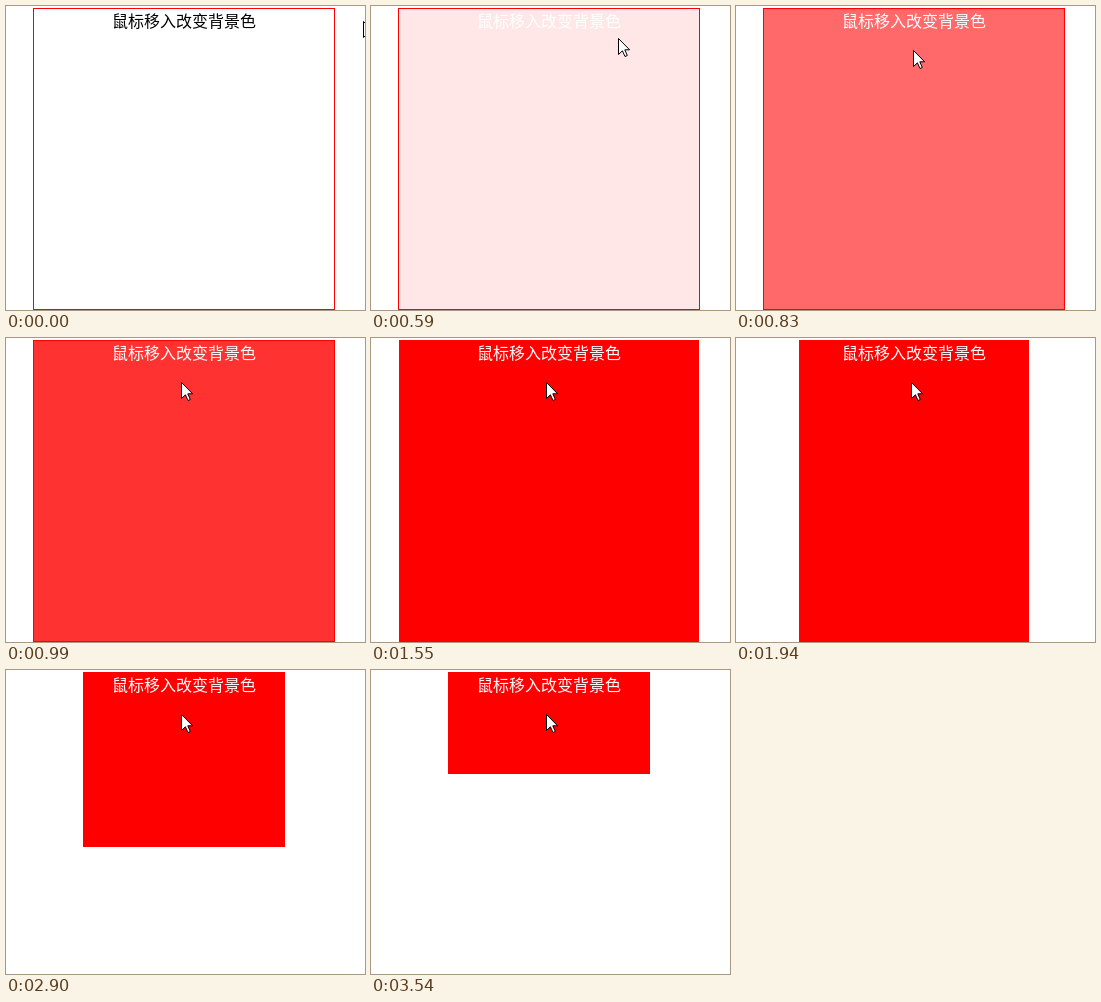
Write an HTML page that moves like this. It is 359 by 304 pixels and loops after 4.16 s.

```html
<!DOCTYPE html>
<html lang="zh">
<head>
<meta charset="utf-8">
<title>鼠标移入改变背景色</title>
<style>
  html, body { margin: 0; width: 100%; height: 100%; overflow: hidden; background: #fff; }
  #stage { position: relative; width: 359px; height: 304px; overflow: hidden; }
  #box { position: absolute; top: 2px; box-sizing: border-box; border: 1px solid #f00; }
  #label {
    position: absolute; top: 2px; left: 78px; width: 200px;
    text-align: center; white-space: nowrap;
    font: 16px/24px "Noto Sans CJK SC", "Noto Sans CJK", "Noto Sans CJK JP", sans-serif;
  }
  #cursor { position: absolute; left: 0; top: 0; }
</style>
</head>
<body>
<div id="stage">
  <div id="box"></div>
  <div id="label">鼠标移入改变背景色</div>
  <svg id="cursor" width="13" height="20">
    <path d="M.5 .5V16.5L4.4 12.8L7 18.5L9.3 17.5L6.8 11.8H11.6Z" fill="#fff" stroke="#000"/>
  </svg>
</div>
<script>
const LOOP = 4160, STEP = 80, CENTER = 178;
const [box, label, cursor] = ['box', 'label', 'cursor'].map(id => document.getElementById(id));

// Screen time -> time since the pointer entered the box
const CLOCK = [[490, 0], [990, 500], [1940, 1425], [2020, 1500], [2900, 2370], [3060, 2517], [3540, 3000]];
// Time, x, y of the pointer tip
const POINTER = [[0, 357, 15], [429, 357, 15], [430, 338, 18], [510, 296, 24], [590, 247, 32],
  [670, 207, 39], [750, 182, 43], [830, 177, 44], [910, 175, 44]];

function lerpTable(table, t, col = 1) {
  if (t <= table[0][0]) return table[0][col];
  const i = table.findIndex(row => row[0] > t);
  if (i < 0) return table[table.length - 1][col];
  const a = table[i - 1], b = table[i];
  return a[col] + (b[col] - a[col]) * (t - a[0]) / (b[0] - a[0]);
}

// cubic-bezier(.25, .1, .25, 1)
function ease(x) {
  if (x <= 0) return 0;
  if (x >= 1) return 1;
  const curve = (p, q, s) => 3 * p * s * (1 - s) ** 2 + 3 * q * s * s * (1 - s) + s ** 3;
  let lo = 0, hi = 1;
  for (let i = 0; i < 30; i++) {
    const mid = (lo + hi) / 2;
    if (curve(.25, .25, mid) < x) lo = mid; else hi = mid;
  }
  return curve(.1, 1, lo);
}

// The screen refreshes in steps of 80 ms
function snap(t) {
  if (t < 430) return 0;
  const base = t < 1940 ? 430 : 1940;
  return base + Math.floor((t - base) / STEP) * STEP;
}

function draw(time) {
  const t = snap(time);
  const since = lerpTable(CLOCK, t);
  const phase = n => ease(since / 1000 - n);

  const width = 302 - 100 * phase(1);
  const left = Math.round(CENTER - width / 2);
  const right = Math.round(CENTER + width / 2);
  const tint = Math.round(255 * (1 - phase(0)));
  box.style.left = left + 'px';
  box.style.width = right - left + 'px';
  box.style.height = Math.round(302 - 200 * phase(2)) + 'px';
  box.style.backgroundColor = `rgb(255, ${tint}, ${tint})`;
  label.style.color = since > 0 ? '#fff' : '#000';

  const [x, y] = [1, 2].map(col => Math.round(lerpTable(POINTER, t, col)));
  cursor.style.transform = `translate(${x}px, ${y}px)`;
}

const start = performance.now();
function tick() {
  draw((performance.now() - start) % LOOP);
  requestAnimationFrame(tick);
}
tick();
</script>
</body>
</html>
```
